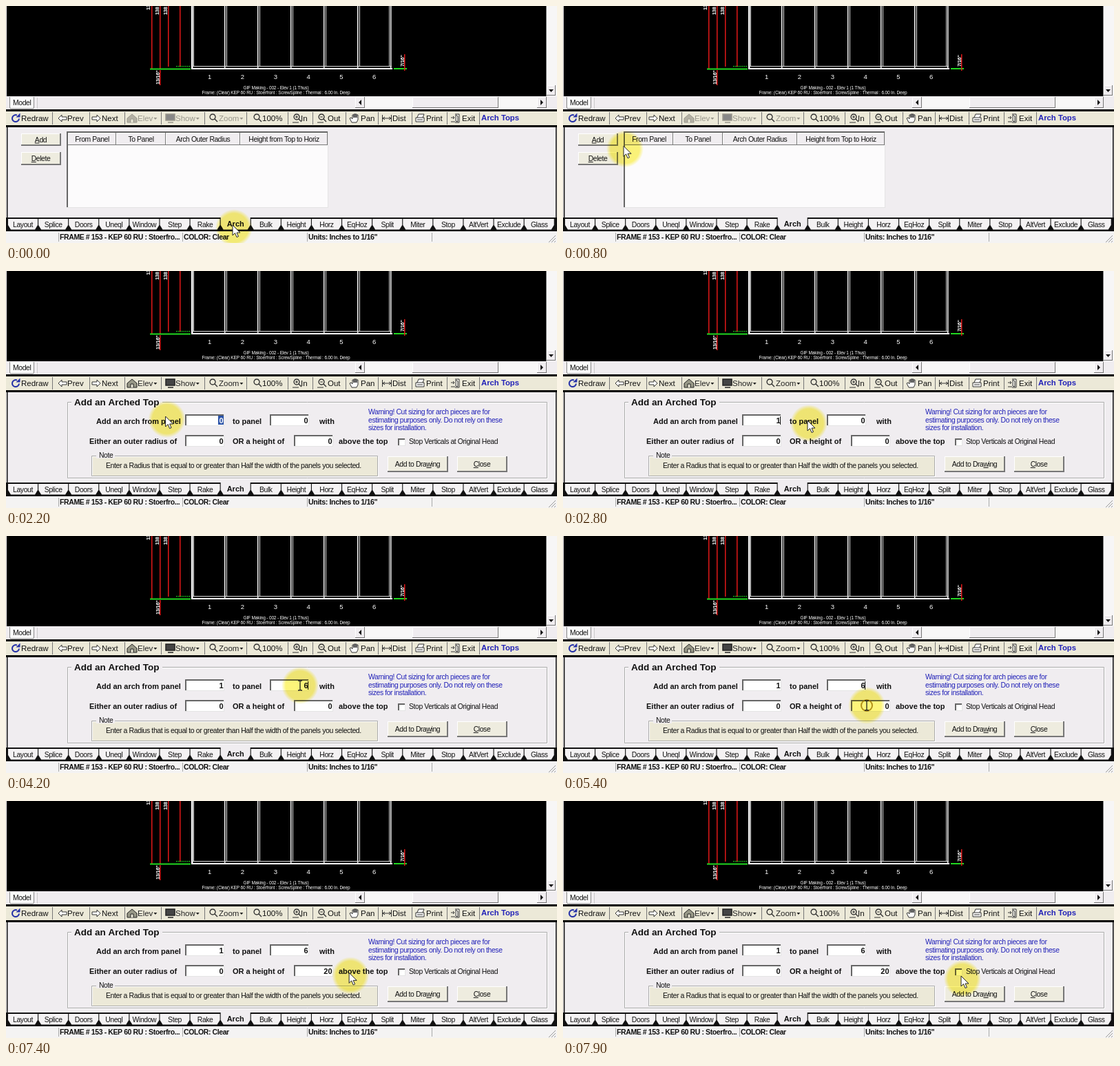
Recreate the animation shown at these times as an HTML page with a canvas. Size 800 by 344 pixels, loop 8 s.

```html
<!DOCTYPE html>
<html lang="en">
<head>
<meta charset="utf-8">
<title>Arch tops</title>
<style>
  html, body { margin: 0; width: 100%; height: 100%; overflow: hidden; background: #f0edf0; }
  canvas { display: block; }
</style>
</head>
<body>
<canvas id="stage" width="800" height="344"></canvas>
<script>
const ctx = document.getElementById('stage').getContext('2d');
const LOOP = 8000, STEP = 100, PANEL_OPEN = 1400;
const FACE = '#f0edf0', BEIGE = '#ece9d8', GREY = '#99978c', BLUE = '#2222b8';

// Drawing helpers
function rect(x, y, w, h, color) {
  ctx.fillStyle = color;
  ctx.fillRect(x, y, w, h);
}
function path(d, stroke, fill, width = 1) {
  const p = new Path2D(d);
  if (fill) { ctx.fillStyle = fill; ctx.fill(p); }
  if (stroke) { ctx.strokeStyle = stroke; ctx.lineWidth = width; ctx.stroke(p); }
}
function text(s, x, y, { size = 10.4, bold = false, color = '#111', align = 'left', gap = -0.4 } = {}) {
  ctx.font = `${bold ? 'bold ' : ''}${size}px "Liberation Sans", Arial, sans-serif`;
  ctx.letterSpacing = gap + 'px';
  ctx.textAlign = align;
  ctx.textBaseline = 'alphabetic';
  ctx.fillStyle = color;
  ctx.fillText(s, x, y);
}
function vertical(s, x, y) {
  ctx.save();
  ctx.translate(x, y);
  ctx.rotate(-Math.PI / 2);
  text(s, 0, 0, { size: 7.5, bold: true, color: '#fff', gap: -0.3 });
  ctx.restore();
}
function raised(x, y, w, h, face = FACE) {
  rect(x, y, w, h, '#777');
  rect(x, y, w - 1, h - 1, '#fff');
  rect(x + 1, y + 1, w - 2, h - 2, face);
}
function sunken(x, y, w, h, face = '#fff') {
  rect(x, y, w, h, '#e4e4e4');
  rect(x, y, w - 1, h - 1, '#666');
  rect(x + 2, y + 2, w - 3, h - 3, face);
}
function button(label, x, y, w, h, hot) {
  rect(x, y, w + 1, h + 1, '#777');
  raised(x, y, w, h, '#eeecdf');
  const left = x + w / 2, base = y + h / 2 + 4;
  text(label, left, base, { align: 'center' });
  const full = ctx.measureText(label).width;
  const before = ctx.measureText(label.slice(0, hot)).width;
  rect(left - full / 2 + before, base + 1, ctx.measureText(label[hot]).width, 1, '#222');
}

function drawing() {
  rect(1, 0, 783, 131, '#000');
  for (let i = 0; i <= 6; i++) {
    const x = Math.round(269 + i * 48.1);
    rect(x, 0, i ? 1.5 : 2.5, 91, '#fff');
    rect(x + 3, 0, i < 6 ? 1 : 0, 88, '#ddd');
    if (i === 6) rect(x - 2, 0, 1, 88, '#ddd');
    else text(i + 1, 295.5 + i * 47.8, 106, { size: 9.5, color: '#fff', align: 'center' });
  }
  rect(270, 87, 290, 1, '#ddd');
  rect(269, 90, 292, 2, '#fff');
  const caption = { size: 6.5, color: '#fff', align: 'center', gap: -0.15 };
  text('GIF Making - 002 - Elev 1 (1 Thus)', 392, 121, caption);
  text('Frame: (Clear) KEP 60 RU : Stoerfront : ScrewSpline : Thermal : 6.00 In. Deep', 392, 128, caption);

  const red = '#e01818', green = '#20d820';
  [[211, 91], [223, 91], [235, 88], [252, 88]].forEach(([x, h]) => rect(x, 0, 1.5, h, red));
  rect(223, 93, 1.5, 22, red);
  rect(209, 90.5, 59, 2, green);
  for (let x = 247; x < 267; x += 3) rect(x, 87, 2, 1, green);
  rect(563, 90, 19, 2, green);
  rect(578, 70, 1.5, 24, red);
  vertical('138 1/16"', 209, 6);
  vertical('138 1/16"', 222, 13);
  vertical('138 3/8"', 234, 13);
  vertical('13/16"', 223, 114);
  vertical('7/16"', 578, 88);
}

function scrollbars() {
  rect(784, 0, 16, 131, '#f7f6f6');
  rect(784, 0, 1, 131, '#888');
  raised(785, 115, 13, 15);
  path('M788 121h7l-3.5 4z', null, '#111');
  rect(0, 131, 800, 19, FACE);
  path('M5.5 132v15q0 2 2 2h31q2 0 2-2v-15', '#888', '#fafafa');
  text('Model', 10, 144);
  rect(45, 133, 1, 16, '#ccc');
  rect(507, 132, 278, 16, '#f8f7f7');
  raised(507, 132, 14, 16);
  path('M516 136v8l-4-4z', null, '#111');
  raised(590, 132, 125, 16);
  raised(771, 132, 14, 16);
  path('M776 136v8l4-4z', null, '#111');
}

function lens(x, detail = '') {
  path(`M${x + 4} 157a4 4 0 1 0 .1 0M${x + 7} 164l4 4`, '#333', null, 1.4);
  if (detail) path(`M${x + 2} 161h4${detail === '+' ? 'm-2-2v4' : ''}M${x - 2} 169h9`, '#333');
}
function toolbar(open) {
  rect(0, 150, 800, 26, '#000');
  rect(0, 153, 800, 20, BEIGE);
  [67, 121, 172, 225, 288, 349, 409, 445, 493, 540, 589, 640, 687].forEach(x => rect(x, 154, 1, 18, '#777'));
  const ink = open ? '#222' : GREY;

  path('M16 158.500a5 5 0 1 0 3 5', '#2430a8', null, 2);
  path('M14.500 161.500h6v-6z', null, '#2430a8');
  path('M76 163l5-5v3h7v4h-7v3z', '#333', '#fff');
  path('M137 163l-5-5v3h-7v4h7v3z', '#333', '#fff');
  path('M176 163l7-6 7 6v6h-14z', ink, open ? '#998' : '#b4b1a4');
  path('M181 169v-5h4v5', ink, BEIGE);
  path('M232 157h13v9h-13zM235 169h8', ink, open ? '#444' : '#888', 1.5);
  [296, 360].forEach(x => lens(x));
  lens(418, '+');
  lens(454, '-');
  path('M502 169l-3-6 2-1 2 2v-6h2v4-5h2v5-5h2v5-4h2v7l-2 4z', '#333', '#fff');
  path('M546.5 158v10M559.5 158v10M547 163h12M550 161l-3 2 3 2M556 161l3 2-3 2', '#333');
  path('M597 162l2-5h8l-2 5M595 162h12v6h-12zM597 165h8', '#333', '#fff');
  path('M652 157h6v12h-6M653 158l3 2v8l-3-1zM646 162h5m-2-2l2 2-2 2M646 168h6', '#333', '#fff8');

  const labels = [['Redraw', 22], ['Prev', 89], ['Next', 139], ['Elev', 191, 1], ['Show', 246, 1], ['Zoom', 309, 1],
    ['100%', 372], ['In', 428], ['Out', 467], ['Pan', 515], ['Dist', 561], ['Print', 610], ['Exit', 662]];
  labels.forEach(([s, x, menu]) => {
    text(s, x, 167, { size: 11.5, gap: 0, color: menu ? ink : '#111' });
    if (menu) path(`M${x + ctx.measureText(s).width + 1} 162h5l-2.500 3z`, null, ink);
  });
  text('Arch Tops', 690, 166, { size: 11.3, bold: true, color: BLUE, gap: 0 });
}

function tabs() {
  rect(0, 307, 800, 20, '#111');
  const names = 'Layout Splice Doors Uneql Window Step Rake Arch Bulk Height Horz EqHoz Split Miter Stop AltVert Exclude Glass'.split(' ');
  names.forEach((name, i) => {
    const x = 3 + i * 44.1, active = name === 'Arch';
    path(`M${x} ${active ? 306 : 309}V318l4 6.500h35l4-6.500V${active ? 306 : 309}z`, null, active ? FACE : '#f4f2f3');
    text(name, x + 21.5, active ? 320 : 321, active
      ? { size: 11, bold: true, align: 'center', gap: 0 }
      : { align: 'center' });
  });
  rect(0, 327, 800, 17, '#f4f3f3');
  [76, 256, 437, 618].forEach(x => rect(x, 329, 1, 13, '#aaa'));
  path('M788 343l10-10M792 343l6-6M796 343l2-2', '#999');
  text('FRAME # 153 - KEP 60 RU : Stoerfro...', 78, 339, { size: 10.5, bold: true });
  text('COLOR: Clear', 258, 339, { size: 10.5, bold: true });
  text('Units: Inches to 1/16"', 439, 339, { size: 10.7, bold: true });
  [1, 798].forEach(x => rect(x, 176, 1.5, 151, '#111'));
}

function listPanel() {
  button('Add', 22, 185, 57, 17, 0);
  button('Delete', 22, 212, 57, 18, 0);
  sunken(88, 182, 380, 111, '#fcfbfc');
  [['From Panel', 90, 160], ['To Panel', 160, 232], ['Arch Outer Radius', 232, 340], ['Height from Top to Horiz', 340, 467]]
    .forEach(([s, a, b]) => {
      raised(a, 184, b - a, 18);
      text(s, (a + b) / 2, 197, { align: 'center' });
    });
}

const FIELDS = [[260, 208], [383, 208], [260, 238], [418, 238]];
function field(i, value, selected, caret) {
  const [x, y] = FIELDS[i];
  sunken(x, y, 57, 17);
  if (selected) rect(x + 48, y + 2, 8, 13, '#2a52a8');
  text(value, x + 55.5, y + 12.5, { size: 11, bold: true, align: 'right', gap: 0, color: selected ? '#fff' : '#111' });
  if (caret) rect(x + 55, y + 3, 1, 12, '#111');
}
function frame(x, y, w, h) {
  path(`M${x + 1.5} ${y + 1.5}h${w}v${h}h${-w}z`, '#fff');
  path(`M${x + .5} ${y + .5}h${w}v${h}h${-w}z`, '#aaa');
}
function formPanel(t) {
  frame(89, 190, 696, 110);
  rect(95, 187, 132, 8, FACE);
  text('Add an Arched Top', 99, 195, { size: 13.5, bold: true, gap: 0 });
  [['Add an arch from panel', 131, 222], ['to panel', 329, 222], ['with', 455, 222], ['Either an outer radius of', 121, 251],
    ['OR a height of', 329, 251], ['above the top', 483, 251]]
    .forEach(([s, x, y]) => text(s, x, y, { size: 11, bold: true, gap: 0 }));

  field(0, t < 2400 ? '0' : '1', t < 2400, t >= 2400 && t < 3500);
  field(1, t < 3800 ? '0' : '6', t >= 3500 && t < 3800, t >= 3800 && t < 5600);
  field(2, '0');
  field(3, t < 6200 ? '0' : t < 6700 ? '2' : '20', t >= 5600 && t < 6200);

  ['Warning! Cut sizing for arch pieces are for', 'estimating purposes only. Do not rely on these', 'sizes for installation.']
    .forEach((s, i) => text(s, 526, 208 + i * 11.5, { color: BLUE }));
  sunken(569, 243, 11, 11);
  text('Stop Verticals at Original Head', 585, 251);

  rect(124, 268, 416, 30, BEIGE);
  frame(124, 268, 415, 29);
  rect(131, 264, 27, 8, FACE);
  text('Note', 135, 271);
  text('Enter a Radius that is equal to or greater than Half the width of the panels you selected.', 145, 286, { size: 10.5 });
  button('Add to Drawing', 554, 269, 87, 22, 10);
  button('Close', 655, 269, 72, 22, 0);
}

// Pointer path: time, x, y, and whether the leg towards it is eased
const PATH = [[400, 329, 318], [900, 60, 190, true], [1700, 60, 190], [2100, 211, 210], [2800, 355, 217],
  [3400, 427, 217], [4200, 427, 217], [5000, 441, 246, true], [7000, 441, 246], [7900, 578, 254, true]];
const CLICKS = [1300, 3300, 5300];

function pointerAt(t) {
  const i = PATH.findIndex(key => t < key[0]);
  if (i === 0) return PATH[0].slice(1, 3);
  if (i < 0) return PATH[PATH.length - 1].slice(1, 3);
  const [t0, x0, y0] = PATH[i - 1], [t1, x1, y1, eased] = PATH[i];
  let u = (t - t0) / (t1 - t0);
  if (eased) u = u * u * (3 - 2 * u);
  return [x0 + (x1 - x0) * u, y0 + (y1 - y0) * u];
}

function highlight(x, y) {
  const glow = ctx.createRadialGradient(x, y, 21, x, y, 27);
  glow.addColorStop(0, '#fdf57a');
  glow.addColorStop(1, '#fdf57a00');
  ctx.globalCompositeOperation = 'multiply';
  ctx.beginPath();
  ctx.arc(x, y, 27, 0, 2 * Math.PI);
  ctx.fillStyle = glow;
  ctx.fill();
  ctx.globalCompositeOperation = 'source-over';
}

function pointer(t) {
  const alpha = t >= 7100 ? 1 : Math.max(0, Math.min(1, (6300 - t) / 300));
  if (!alpha) return;
  const [x, y] = pointerAt(t);
  const overField = t >= PANEL_OPEN && FIELDS.some(([fx, fy]) => x > fx && x < fx + 57 && y > fy && y < fy + 17);
  ctx.save();
  ctx.globalAlpha = alpha;
  ctx.translate(x, y);
  if (overField) highlight(0, 0); else highlight(2, 4);

  const click = CLICKS.find(c => t >= c && t < c + 500);
  if (click) {
    const age = (t - click) / STEP;
    ctx.save();
    ctx.globalAlpha = 1 - age * .2;
    ctx.beginPath();
    ctx.arc(0, 0, 10 - age * 2, 0, 2 * Math.PI);
    ctx.strokeStyle = '#a07800';
    ctx.lineWidth = 2;
    ctx.stroke();
    ctx.restore();
  }
  if (overField) path('M-3 -7h2l1 1 1-1h2M0 -6v12M-3 7h2l1-1 1 1h2', '#222', null, 1.3);
  else path('M0 0v15l3.500-3.500 2.500 6 2.500-1-2.500-5.500h5z', '#222', '#fff');
  ctx.restore();
}

function render(now) {
  const t = Math.floor(now % LOOP / STEP) * STEP;
  const open = t >= PANEL_OPEN;
  rect(0, 0, 800, 344, FACE);
  drawing();
  scrollbars();
  toolbar(open);
  if (open) formPanel(t); else listPanel();
  tabs();
  pointer(t);
  requestAnimationFrame(render);
}
requestAnimationFrame(render);
</script>
</body>
</html>
```
